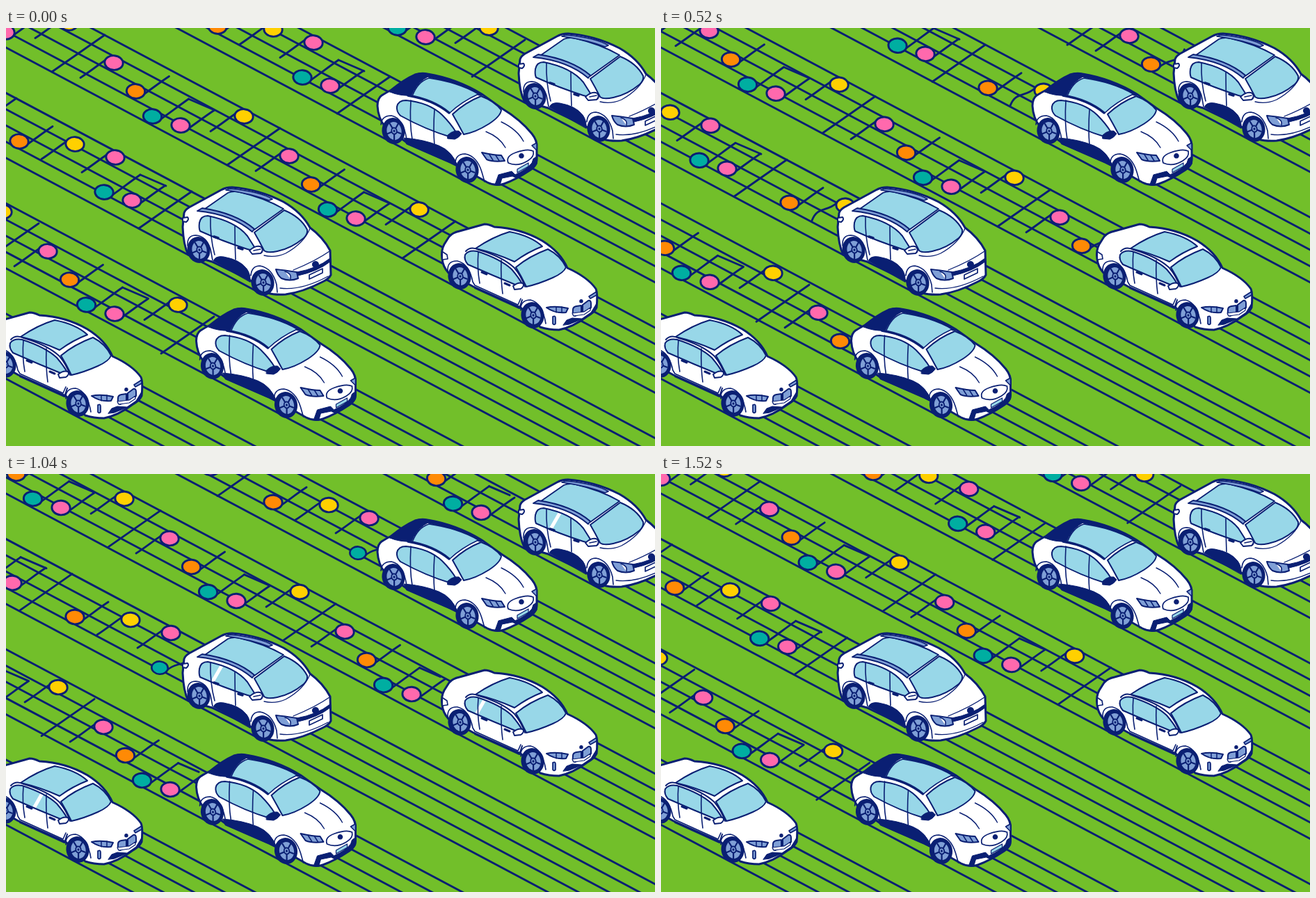
These frames come from a looping animation (933x601 px, 1.56 s). An HTML page with a canvas:

```html
<!DOCTYPE html>
<html lang="en">
<head>
<meta charset="utf-8">
<title>Cars on staves</title>
<style>
html, body { margin: 0; width: 100%; height: 100%; overflow: hidden; background: #72bf2a; }
canvas { display: block; }
</style>
</head>
<body>
<canvas id="stage" width="933" height="601"></canvas>
<script>
const ctx = document.getElementById('stage').getContext('2d');
const NAVY = '#0a1f73', SKY = '#98d7e8', BLUE = '#7f9fd6', WHITE = '#fff';
const PINK = '#ff69ad', ORANGE = '#ff8a05', TEAL = '#00aea1', YELLOW = '#ffd000';
const LOOP = 1560, STEP = 40, CYCLE = 1520;
const SLOPE = 134 / 252, SPEED = 251.3 / CYCLE;
const clamp = v => Math.max(0, Math.min(1, v));

// --- Staves and notes ---

const STAVES = 6, FIRST = -382.6, PITCH = 158.7, GAP = 23.35;

// note: dx, dy, colour, stem side, time of appearance
const tuneA = {
  notes: [
    [0, 0, PINK, -1, 80], [31.5, 41, ORANGE, 1, 340], [55.5, 77, TEAL, 1, 520],
    [96, 90, PINK, 1, 600], [187, 77, YELLOW, -1, 950]
  ],
  beam: 2,
  bar: [239, 94]
};
const tuneB = {
  notes: [
    [0, 0, ORANGE, 1, 80], [80, 4, YELLOW, -1, 330], [138, 23, PINK, -1, 650],
    [122, 73, TEAL, 1, 880], [162, 85, PINK, 1, 980]
  ],
  beam: 3,
  bar: [248, 72]
};
const TUNES = [
  [tuneA, 659, 318], [tuneA, 759, 57], [tuneA, 312, 455],
  [tuneB, 271, 297], [tuneB, 556, 132]
];

function line(x1, y1, x2, y2) {
  ctx.beginPath();
  ctx.moveTo(x1, y1);
  ctx.lineTo(x2, y2);
  ctx.stroke();
}

function note(x, y, color, side, age, beamed) {
  const scale = clamp(age / 180);
  if (!scale) return;
  const bend = clamp(1 - (age - 120) / 250);
  const mix = (a, b) => a + (b - a) * bend;
  ctx.save();
  ctx.translate(x, y);
  ctx.scale(scale, scale);
  ctx.save();
  ctx.scale(-side, -side);
  ctx.beginPath();
  ctx.moveTo(beamed ? -52 : -48, beamed ? 25 : 21.5);
  ctx.bezierCurveTo(mix(-35, -42), mix(13, -4), mix(-24, -28), mix(4.3, 12), -12, -4);
  ctx.stroke();
  ctx.restore();
  ctx.beginPath();
  ctx.ellipse(0, 0, 13.2, 10.3, 0.08, 0, Math.PI * 2);
  ctx.fillStyle = color;
  ctx.fill();
  ctx.stroke();
  ctx.restore();
}

function drawTune([tune, x0, y0], t) {
  for (let n = -3; n <= 0; n++) {
    const dx = 252 * n - SPEED * t;
    const x = x0 + dx, y = y0 + dx * SLOPE, now = t - n * CYCLE;
    if (now > 1080) {
      const [bx, by] = tune.bar;
      line(x + bx, y + by, x + bx - 76, y + by + 53);
    }
    const [tx, ty, , , born] = tune.notes[tune.beam];
    const grow = clamp((now - born - 360) / 200);
    if (grow) line(x + tx + 52, y + ty - 25, x + tx + 52 + 37 * grow, y + ty - 25 + 16 * grow);
    tune.notes.forEach(([nx, ny, color, side, start], i) =>
      note(x + nx, y + ny, color, side, now - start, i === tune.beam));
  }
}

// --- Cars ---

// part: path, fill, stroke width
const part = (d, fill, width = 0) => ({ path: new Path2D(d), fill, width });

const hatch = {
  parts: [
    part('M254 286L256 266Q257 262 263 258L309 233Q316 229 325 229Q364 232 399 250Q425 265 437 287Q456 301 466 320L467 355Q464 361 455 365Q426 380 402 383Q386 384 376 381L350 362L296 336L262 326Q255 312 254 286Z', WHITE, 3),
    part('M286 260L319 237Q326 234 336 236Q371 244 399 260L357 290Q326 270 286 260Z', SKY, 1.8),
    part('M275 263L282 259Q330 266 357 289L354 293Q325 268 275 263Z', BLUE, 1.8),
    part('M316 233L322 231Q365 235 383 246L378 248Q352 238 316 233Z', BLUE, 1.6),
    part('M357 294L400 262Q424 272 433 290Q434 296 428 302Q410 317 390 321Q376 324 371 320Q364 306 357 294Z', SKY, 2),
    part('M298 335Q301 327 313 329Q336 333 346 346Q352 354 351 365Z', NAVY, 1),
    part('M261 313Q260 298 273 298Q288 299 294 318L297 334M352 356Q353 342 365 342Q383 345 389 369L390 380', null, 1.6),
    part('M437 288Q429 309 402 324Q386 331 371 327M413 348Q445 335 465 321', null, 1.3),
    part('M254 273L261 272Q264 275 259 279L254 278Z', WHITE, 2),
    part('M388 347Q399 348 418 351L420 360Q408 365 396 360Q390 355 388 347Z', BLUE, 2),
    part('M401 350Q411 353 409 361', WHITE, 1.5),
    part('M418 351Q447 346 466 331L466 336Q448 350 420 356Z', NAVY, 1),
    part('M436 355L455 346V352L436 361Z', WHITE, 1.7),
    part('M394 374Q424 378 463 357', null, 1.4),
    part('M445 335A5 5 0 1 1 444.9 335Z', NAVY)
  ],
  window: part('M278 280Q280 270 290 270Q330 278 347 299L359 318Q353 320 347 318Q310 306 279 292Q277 288 278 280Z', SKY, 2),
  over: [
    part('M294 271Q293 300 300 326M329 285Q329 310 330 333', null, 1.6),
    part('M299 300L305 302M334 316L340 318', null, 3.5),
    part('M350 320Q360 311 367 315Q371 320 366 324L354 325Z', WHITE, 2),
    part('M356 320L366 318', null, 1.5)
  ],
  middle: [318, 291],
  wheels: [[277, 319], [369, 366]]
};

const coupe = {
  parts: [
    part('M534 112Q534 101 540 97Q548 92 554 89Q572 74 588 67Q597 64 606 66Q648 73 684 95L712 115Q740 132 756 152Q764 162 763 172L763 190Q763 198 754 204Q733 218 716 224Q704 228 692 222L646 196L578 166L545 142Q535 130 534 112Z', WHITE, 3),
    part('M552 92Q571 75 590 66Q598 63 610 68L600 74Q589 83 583 97Q566 98 552 92Z', NAVY, 1),
    part('M597 65Q650 71 685 97L680 97Q650 79 608 71Z', NAVY, 1),
    part('M584 98Q592 77 608 72Q650 78 679 95Q655 106 638 122Q612 104 584 98Z', SKY, 1.5),
    part('M578 97Q614 103 637 122', null, 3.5),
    part('M642 124Q660 107 683 98Q702 105 712 118Q711 127 694 138Q675 150 658 153Q650 138 642 124Z', SKY, 2),
    part('M572 158Q600 160 622 169Q642 177 650 200L638 194L576 167Z', NAVY, 1),
    part('M539 139Q540 126 554 126Q571 129 576 160M646 197Q645 181 660 181Q677 184 684 207L688 221', null, 1.6),
    part('M690 149Q710 157 718 172M712 135Q735 146 744 163', null, 1.4),
    part('M684 179Q702 183 712 183L717 191Q700 193 691 189Z', BLUE, 2),
    part('M695 182L700 190M704 183L709 191', null, 1.5),
    part('M722 194Q718 184 733 179Q750 173 758 177Q760 185 750 191Q735 200 722 194Z', WHITE, 1.7),
    part('M703 225L708 211L727 206L732 211Q749 203 756 194L758 188L764 184L763 196Q752 207 734 216L728 213L713 216L710 226Z', NAVY, 1),
    part('M735 203L751 194V199L735 208Z', SKY, 1.2),
    part('M756 169L763 165V176Z', BLUE, 1.5),
    part('M741 180A3.8 3.8 0 1 1 740.9 180Z', NAVY)
  ],
  window: part('M562 113Q564 104 575 104Q608 107 627 125Q640 138 647 150L640 157Q603 146 567 126Q561 120 562 113Z', SKY, 2),
  over: [
    part('M582 104Q580 138 584 160M616 117Q614 146 616 169', null, 1.6),
    part('M635 154Q642 147 651 148L655 152Q651 158 645 160L635 159Z', NAVY, 1)
  ],
  middle: [607, 126],
  wheels: [[557, 148], [663, 204]]
};

const sedan = {
  parts: [
    part('M627 332Q625 320 630 311L637 300Q642 294 652 292L688 282Q694 282 702 286Q740 288 771 306Q797 322 807 345Q836 358 848 375Q851 382 849 402Q846 409 835 415Q815 430 795 434Q780 434 768 430L740 402L672 372L636 352Q628 343 627 332Z', WHITE, 3),
    part('M675 317Q700 300 724 293Q755 299 771 314Q750 322 731 336Q705 324 675 317Z', SKY, 2),
    part('M733 344Q752 328 779 318Q797 327 805 344Q802 352 786 359Q766 368 748 372Q741 357 733 344Z', SKY, 2),
    part('M661 321Q668 313 680 319Q714 329 731 345Q741 357 746 372', null, 2),
    part('M635 350Q634 334 649 335Q666 339 671 365L674 370L736 398L740 389M740 406Q739 391 754 391Q771 395 776 425', null, 1.6),
    part('M674 374L738 403L742 391', null, 2),
    part('M628 322L634 326L635 332L628 333', WHITE, 1.6),
    part('M777 402Q790 399 808 403L805 409Q790 411 777 402Z', BLUE, 2),
    part('M791 401V409M799 401V409', null, 1.5),
    part('M838 386L849 379V384L840 389Z', BLUE, 1.6),
    part('M786 415Q790 413 790 417V425Q788 428 786 425Z', BLUE, 1.7),
    part('M801 427L806 420L814 417L828 418L841 409L849 396V403Q842 412 827 419L810 426Z', NAVY, 1),
    part('M815 405Q815 401 820 400L827 399V410L818 414Q814 414 815 405ZM829 398L837 392Q841 391 841 396V402Q840 405 829 409Z', BLUE, 2),
    part('M814 410L831 408L840 402V406L831 412L816 414Z', WHITE, 1.2),
    part('M827 390A2.8 2.8 0 1 1 826.9 390Z', NAVY)
  ],
  window: part('M660 326Q665 319 677 321Q711 332 727 347Q738 360 742 368L737 371Q700 356 664 340Q658 333 660 326Z', SKY, 2),
  over: [
    part('M679 322Q677 345 681 367M712 334Q711 360 714 382', null, 1.6),
    part('M684 351L691 354M717 367L724 370', null, 3),
    part('M729 371Q736 365 743 367Q746 371 740 375L731 376Z', WHITE, 2)
  ],
  middle: [702, 343],
  wheels: [[652, 357], [757, 413]]
};

// car, offset, glint keys [time, x]
const CARS = [
  [hatch, 0, 0, [[100, 341], [120, 333], [160, 317], [360, 297], [400, 282]]],
  [hatch, 483, -221, [[100, 341], [120, 335], [160, 329], [360, 294], [400, 282]]],
  [coupe, 0, 0, [[80, 641], [120, 622], [160, 603], [280, 560]]],
  [coupe, -260.5, 338, [[300, 635], [360, 611], [440, 595], [500, 565]]],
  [sedan, 0, 0, [[80, 728], [120, 710], [160, 707], [360, 667], [400, 655]]],
  [sedan, -654, 127, [[140, 722], [160, 716], [360, 690], [440, 668], [480, 655]]]
];

function paint({ path, fill, width }) {
  if (fill) {
    ctx.fillStyle = fill;
    ctx.fill(path);
  }
  if (width) {
    ctx.lineWidth = width;
    ctx.stroke(path);
  }
}

function disc(rx, ry, fill) {
  ctx.beginPath();
  ctx.ellipse(0, 0, rx, ry, -0.2, 0, Math.PI * 2);
  ctx.fillStyle = fill;
  ctx.fill();
}

function wheel([x, y]) {
  ctx.save();
  ctx.translate(x, y);
  disc(16.5, 19, NAVY);
  ctx.translate(1, 0);
  disc(10.5, 13, BLUE);
  ctx.lineWidth = 2.2;
  for (let i = 0; i < 5; i++) {
    const a = i * Math.PI * 0.4 + 0.3;
    line(0, 0, 10 * Math.cos(a), 12.5 * Math.sin(a));
  }
  disc(4.6, 5.6, NAVY);
  disc(2.8, 3.6, BLUE);
  disc(1.5, 1.8, NAVY);
  ctx.restore();
}

function glintAt(keys, t) {
  const i = keys.findIndex(k => k[0] > t);
  if (i < 1) return null;
  const [t0, x0] = keys[i - 1], [t1, x1] = keys[i];
  return x0 + (x1 - x0) * (t - t0) / (t1 - t0);
}

function glint(car, keys, t) {
  const x = glintAt(keys, t % (CYCLE / 2));
  if (x === null) return;
  const y = car.middle[1] + (x - car.middle[0]) * 0.5;
  ctx.save();
  ctx.clip(car.window.path);
  ctx.strokeStyle = WHITE;
  ctx.lineWidth = 5;
  line(x - 12, y + 21, x + 12, y - 21);
  ctx.restore();
}

function drawCar([car, dx, dy, keys], t) {
  ctx.save();
  ctx.translate(dx, dy);
  car.parts.forEach(paint);
  paint({ ...car.window, width: 0 });
  glint(car, keys, t);
  paint({ ...car.window, fill: null });
  car.over.forEach(paint);
  car.wheels.forEach(wheel);
  ctx.restore();
}

function draw(t) {
  ctx.fillStyle = '#72bf2a';
  ctx.fillRect(0, 0, 933, 601);
  ctx.strokeStyle = NAVY;
  ctx.lineWidth = 2.9;
  ctx.lineCap = ctx.lineJoin = 'round';
  for (let s = 0; s < STAVES; s++)
    for (let i = 0; i < 5; i++) {
      const y = FIRST + s * PITCH + i * GAP;
      line(-5, y - 5 * SLOPE, 940, y + 940 * SLOPE);
    }
  TUNES.forEach(tune => drawTune(tune, t));
  CARS.forEach(car => drawCar(car, t));
}

const begin = performance.now();
function tick() {
  const t = (performance.now() - begin) % LOOP;
  draw(Math.floor(t / STEP) * STEP);
  requestAnimationFrame(tick);
}
tick();
</script>
</body>
</html>
```
